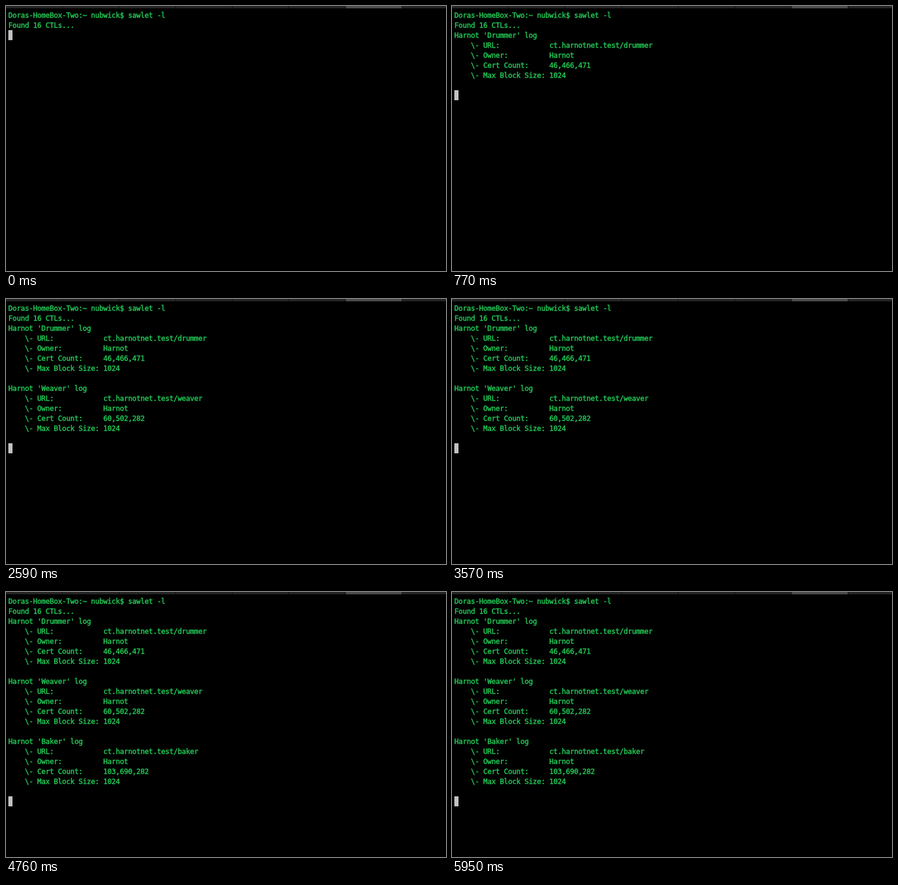
Recreate the animation shown at these times as an HTML page. Size 746x450 px, loop 6.02 s.

```html
<!DOCTYPE html>
<html lang="en">
<head>
<meta charset="utf-8">
<title>Terminal log listing</title>
<style>
  html, body { margin: 0; width: 100%; height: 100%; overflow: hidden; background: #000; }
  #stage { position: relative; width: 746px; height: 450px; overflow: hidden; background: #000; }
  #tabs {
    position: absolute; inset: 0 0 auto; height: 4px;
    background: repeating-linear-gradient(90deg, #242424 0 95px, #0c0c0c 95px 96px);
  }
  #tabs::after {
    content: ""; position: absolute; left: 576px; width: 95px; height: 4px; background: #4b4b4b;
  }
  #screen {
    position: absolute; left: 4px; top: 8px; margin: 0;
    font: 12px/17px "DejaVu Sans Mono", monospace;
    letter-spacing: -0.2246px;
    font-variant-ligatures: none;
    color: #22c354;
    -webkit-text-stroke: 0.5px #22c354;
    white-space: pre;
  }
  #cursor { position: absolute; left: 4px; width: 7px; height: 17px; background: #c2c2c2; }
</style>
</head>
<body>
<div id="stage">
  <div id="tabs"></div>
  <pre id="screen"></pre>
  <div id="cursor"></div>
</div>
<script>
  const LOOP = 6020, TOP = 7, LINE = 17;
  const OWNER = "Harnot", HOST = "ct.harnotnet.test";

  const intro = ["Doras-HomeBox-Two:~ nubwick$ sawlet -l", "Found 16 CTLs..."];

  // Each log is printed as one block at its time in the loop
  const logs = [
    { at: 70, name: "Drummer", count: 46466471 },
    { at: 2590, name: "Weaver", count: 60502282 },
    { at: 4690, name: "Baker", count: 103690282 }
  ];

  const row = (label, value) => "    \\- " + (label + ":").padEnd(16) + value;

  const block = ({ name, count }) => [
    `${OWNER} '${name}' log`,
    row("URL", `${HOST}/${name.toLowerCase()}`),
    row("Owner", OWNER),
    row("Cert Count", count.toLocaleString("en-US")),
    row("Max Block Size", 1024),
    ""
  ];

  const screenEl = document.getElementById("screen");
  const cursorEl = document.getElementById("cursor");
  let shown = -1;

  function draw() {
    const t = performance.now() % LOOP;
    const visible = logs.filter(log => t >= log.at);
    if (visible.length !== shown) {
      shown = visible.length;
      const lines = intro.concat(visible.flatMap(block));
      screenEl.textContent = lines.join("\n");
      cursorEl.style.top = TOP + lines.length * LINE + "px";
    }
    requestAnimationFrame(draw);
  }
  draw();
</script>
</body>
</html>
```
